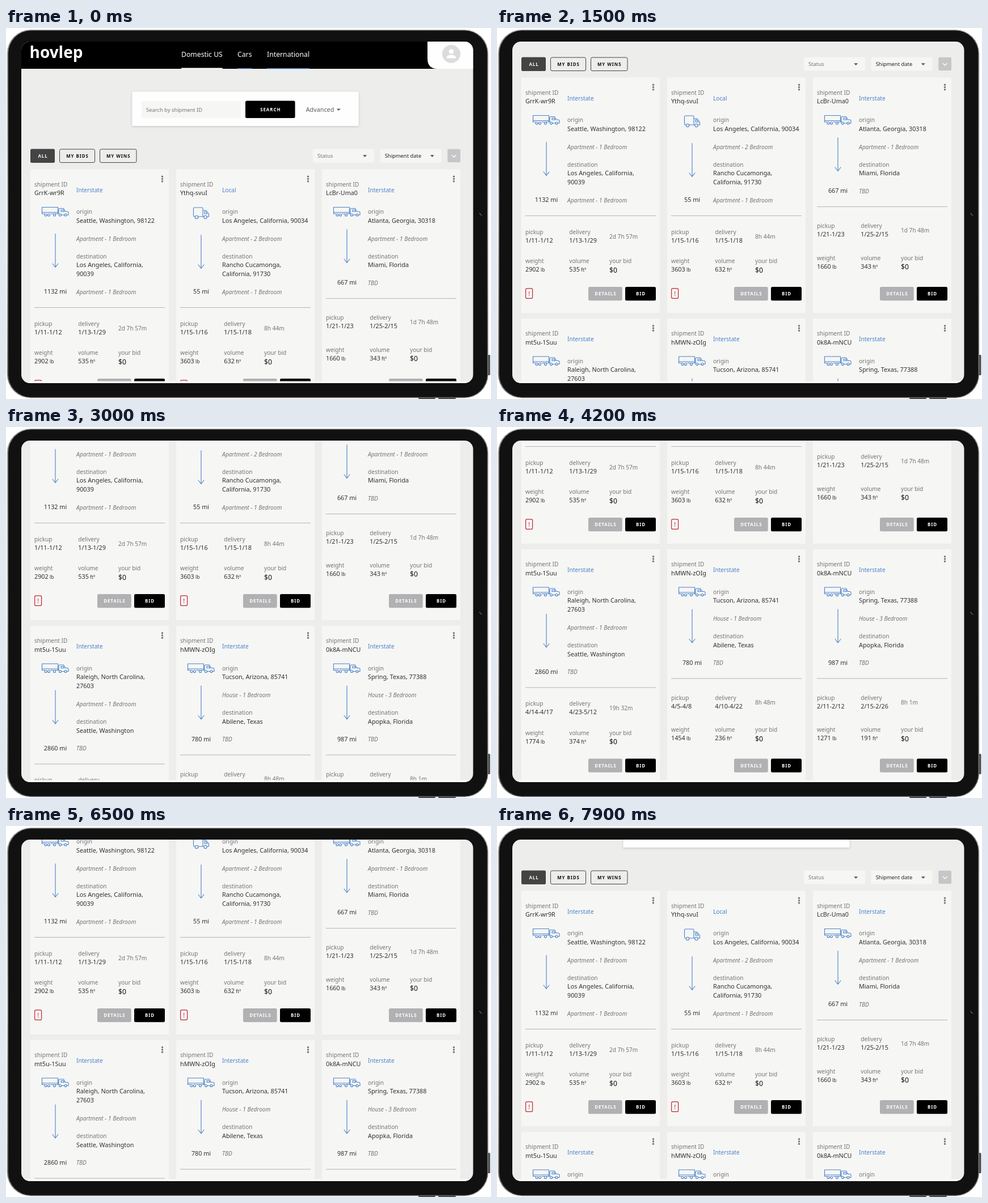
These frames come from a looping animation (855x655 px, 8 s). An HTML page:

```html
<!DOCTYPE html>
<html lang="en">
<head>
<meta charset="utf-8">
<title>Shipment board</title>
<style>
  html, body { margin: 0; width: 100%; height: 100%; overflow: hidden; background: #fff; }
  svg { display: block; width: 855px; height: 655px; }
  text { font-family: "Noto Sans", "Open Sans", sans-serif; white-space: pre; }
  .label { font-size: 10.1px; fill: #757575; }
  .value { font-size: 10.8px; font-weight: 500; fill: #303030; }
  .unit { font-size: 8.6px; font-weight: 400; }
  .kind { font-size: 10.1px; font-style: italic; fill: #757575; }
  .link { font-size: 10.1px; fill: #4a82c9; }
  .price { font-size: 12.24px; fill: #111; }
  .mid { text-anchor: middle; }
  .btn { font-size: 7.92px; font-weight: 700; letter-spacing: .95px; text-anchor: middle; }
  .tab { font-size: 12.24px; fill: #fff; }
  .field { font-size: 9.4px; fill: #757575; }
  .logo { font-size: 28px; font-weight: 700; fill: #fff; }
  .line { fill: none; stroke: #4a82c9; stroke-width: 1.1; stroke-linejoin: round; stroke-linecap: round; }
</style>
</head>
<body>
<svg viewBox="0 0 855 655" xmlns="http://www.w3.org/2000/svg">
  <defs>
    <clipPath id="screen"><rect x="27" y="24" width="796.5" height="603" rx="15"/></clipPath>
    <linearGradient id="metal" x1="0" y1="0" x2="0" y2="1">
      <stop offset="0" stop-color="#8d8e8f"/>
      <stop offset=".5" stop-color="#a9aaab"/>
      <stop offset="1" stop-color="#6c6d6e"/>
    </linearGradient>
    <filter id="soft" x="-5%" y="-20%" width="110%" height="140%">
      <feDropShadow dx="0" dy="1" stdDeviation="2" flood-color="#000" flood-opacity=".18"/>
    </filter>
  </defs>
  <g id="device"></g>
  <g clip-path="url(#screen)">
    <rect x="27" y="24" width="797" height="603" fill="#ededec"/>
    <g id="page"></g>
    <rect x="31" y="623.5" width="789" height="4" fill="#fafaf9"/>
  </g>
</svg>
<script>
const rect = (x, y, w, h, fill, r = 0, extra = '') =>
  `<rect x="${x}" y="${y}" width="${w}" height="${h}" rx="${r}" fill="${fill}" ${extra}/>`;
const text = (x, y, cls, str, fill) =>
  `<text x="${x}" y="${y}" class="${cls}"${fill ? ` style="fill:${fill}"` : ''}>${str}</text>`;
const circle = (x, y, r, fill) => `<circle cx="${x}" cy="${y}" r="${r}" fill="${fill}"/>`;
const line = d => `<path class="line" d="${d}"/>`;
const ring = (x, y, r) => `<circle class="line" cx="${x}" cy="${y}" r="${r}"/>`;
const caret = (x, y, fill) => `<path d="M${x - 3.5} ${y - 1.7}h7l-3.5 3.6z" fill="${fill}"/>`;

function button(x, y, w, h, label, fill, ink = '#fff', extra = '') {
  return rect(x, y, w, h, fill, 2.5, extra) + text(x + w / 2 + .5, y + h / 2 + 2.9, 'btn', label, ink);
}

// Icons are placed relative to the top left corner of a card.
const truck = line('M20.5 67h28v11.5h-5.5M40.5 78.5H36M24.5 78.5h-4V67M50 78.5V71q0-2 2-2h6.500l3 5.500h3.500q2 0 2 2v4h-3M60 80.500h-5M48.500 78.500h1.500M20.500 76h28M54 71.500h4l1.500 3h-5.500z')
  + ring(27, 80.5, 2) + ring(32.5, 80.5, 2) + ring(42.5, 80.5, 2) + ring(52.5, 80.5, 2) + ring(62, 80.5, 2);
const van = line('M33 83.5h-1q-1.500 0-1.500-1.500V69q0-1.500 1.500-1.500h13.500q1.500 0 1.500 1.500v14.500h-8M47 72.500h5.500l5 6v5h-3M48.500 83.500h-1.500M50 74.500h2l3 4h-5z')
  + ring(36, 84.5, 2.7) + ring(51.5, 84.5, 2.7);
const arrow = y => line(`M44 ${y}v59m-5-6.500l5 6.500l5-6.500`);

function card(c, i) {
  const lines = c.from.length + c.to.length;
  const short = lines < 3 ? 1 : 0;
  const shift = 16 * short;
  const isLocal = c.type === 'Local';
  const rows = (list, y) => list.map((s, n) => text(81, y + 16 * n, 'value', s)).join('');
  const second = 94 + 16 * (c.from.length - 1);
  const dest = second + 78.5;
  const dates = 276 - 10.5 * short;
  const load = 327.5 - 5.3 * short;
  const amount = (x, n, unit) => text(x, load + 15, 'value', `${n}<tspan class="unit"> ${unit}</tspan>`);
  const alert = rect(7.6, 372.3, 12, 17.6, 'none', 2.2, 'stroke="#c1272d" stroke-width="1.2"')
    + text(13.6, 385, 'value mid', '!', '#c1272d');
  return `<g transform="translate(${43 + 257 * (i % 3)} ${249.5 + 425.5 * Math.floor(i / 3)})">`
    + rect(0, 0, 244, 415.5, '#f6f6f5')
    + [12.7, 17, 21.3].map(y => circle(232.5, y, 1.7, '#777')).join('')
    + text(7, 30.3, 'label', 'shipment ID') + text(7, 45.6, 'value', c.id)
    + text(81, 40.3, 'link', c.type)
    + (isLocal ? van : truck) + arrow((isLocal ? 116 : 114) - 8 * short)
    + text(44, 219.5 - shift, 'value mid', c.miles + ' mi')
    + text(81, 78.7, 'label', 'origin') + rows(c.from, 94)
    + text(81, second + 32, 'kind', c.home)
    + text(81, second + 63, 'label', 'destination') + rows(c.to, dest)
    + text(81, 220.3 - shift, 'kind', c.end)
    + rect(7, 243.5 - shift, 230, 1, '#b4b4b4')
    + text(7, dates, 'label', 'pickup') + text(7, dates + 15.3, 'value', c.pickup)
    + text(84.3, dates, 'label', 'delivery') + text(84.3, dates + 15.3, 'value', c.delivery)
    + text(155, dates + 8.2, 'label', c.left)
    + text(7, load, 'label', 'weight') + amount(7, c.weight, 'lb')
    + text(84.3, load, 'label', 'volume') + amount(84.3, c.volume, 'ft³')
    + text(155, load, 'label', 'your bid') + text(155, load + 16.6, 'price', '$0')
    + (c.alert ? alert : '')
    + button(118, 369.5, 59.7, 24.3, 'DETAILS', '#b1b1b3')
    + button(183, 369.5, 54, 24.3, 'BID', '#000')
    + '</g>';
}

const ROOM = 'Apartment - 1 Bedroom';
const cards = [
  { id: 'GrrK-wr9R', type: 'Interstate', from: ['Seattle, Washington, 98122'], to: ['Los Angeles, California,', '90039'],
    home: ROOM, end: ROOM, miles: 1132, pickup: '1/11-1/12', delivery: '1/13-1/29', left: '2d 7h 57m', weight: 2902, volume: 535, alert: true },
  { id: 'Ythq-svuI', type: 'Local', from: ['Los Angeles, California, 90034'], to: ['Rancho Cucamonga,', 'California, 91730'],
    home: 'Apartment - 2 Bedroom', end: ROOM, miles: 55, pickup: '1/15-1/16', delivery: '1/15-1/18', left: '8h 44m', weight: 3603, volume: 632, alert: true },
  { id: 'LcBr-Uma0', type: 'Interstate', from: ['Atlanta, Georgia, 30318'], to: ['Miami, Florida'],
    home: ROOM, end: 'TBD', miles: 667, pickup: '1/21-1/23', delivery: '1/25-2/15', left: '1d 7h 48m', weight: 1660, volume: 343 },
  { id: 'mt5u-1Suu', type: 'Interstate', from: ['Raleigh, North Carolina,', '27603'], to: ['Seattle, Washington'],
    home: ROOM, end: 'TBD', miles: 2860, pickup: '4/14-4/17', delivery: '4/23-5/12', left: '19h 32m', weight: 1774, volume: 374 },
  { id: 'hMWN-zOIg', type: 'Interstate', from: ['Tucson, Arizona, 85741'], to: ['Abilene, Texas'],
    home: 'House - 1 Bedroom', end: 'TBD', miles: 780, pickup: '4/5-4/8', delivery: '4/10-4/22', left: '8h 48m', weight: 1454, volume: 236 },
  { id: '0k8A-mNCU', type: 'Interstate', from: ['Spring, Texas, 77388'], to: ['Apopka, Florida'],
    home: 'House - 3 Bedroom', end: 'TBD', miles: 987, pickup: '2/11-2/12', delivery: '2/15-2/26', left: '8h 1m', weight: 1271, volume: 191 }
];

const header = rect(27, 24, 797, 48, '#000')
  + text(41.5, 52.5, 'logo', 'hovlep')
  + text(309, 51, 'tab', 'Domestic US') + rect(309, 70.5, 72.7, 1.8, '#fff')
  + text(408, 51, 'tab', 'Cars') + rect(408, 71, 25.5, 1.2, '#4a82c9')
  + text(460, 51, 'tab', 'International') + rect(460, 71, 75, 1.2, '#4a82c9')
  + '<path d="M743 24h81v48h-63q-18 0-18-18z" fill="#fefefe"/>'
  + circle(785, 45.7, 16, '#dcdcdd') + circle(785, 41.5, 4.2, '#fff')
  + '<path d="M777 53.500v-1.500q0-4.500 8-4.500t8 4.500v1.500z" fill="#fff"/>';

const search = rect(222.5, 112.5, 399, 60.5, '#fefefe', 1.5, 'filter="url(#soft)"')
  + rect(239, 128.7, 175, 30.3, '#f6f6f5', 2)
  + text(247, 147.5, 'field', 'Search by shipment ID')
  + button(422, 128.5, 87.6, 30.5, 'SEARCH', '#000')
  + text(528.7, 148, 'value', 'Advanced', '#5c5c5c') + caret(586.3, 144.2, '#5c5c5c');

const outline = 'stroke="#444" stroke-width="1"';
const filters = button(43, 213.5, 43, 24.5, 'ALL', '#444')
  + button(94.5, 214, 62, 23.5, 'MY BIDS', 'none', '#111', outline)
  + button(165.5, 214, 64.5, 23.5, 'MY WINS', 'none', '#111', outline)
  + rect(541, 213.5, 108, 24, '#f6f6f5', 2) + text(549, 229.3, 'field', 'Status') + caret(632.7, 226, '#555')
  + rect(659.5, 213.5, 108, 24, '#f6f6f5', 2) + text(667.7, 229.3, 'field', 'Shipment date', '#222') + caret(751.3, 226, '#555')
  + rect(778.3, 213.7, 22.7, 23.3, '#c6c6c8', 2)
  + '<path d="M786 224.300l3.800 3.800l3.800-3.800" fill="none" stroke="#fff" stroke-width="1.400"/>';

const device = rect(849, 577, 4.5, 36, '#4a4b4c', 1.5)
  + rect(727, 650, 30, 4.7, '#222', 1.5) + rect(762, 650, 31, 4.7, '#222', 1.5)
  + rect(1.8, 3, 848.4, 650.3, 'url(#metal)', 42)
  + rect(4, 4.5, 844.5, 647.3, '#111', 40)
  + '<path d="M835 326.500q0.500 3.500 4 4.500" fill="none" stroke="#8a8a8a" stroke-width="1"/>';

const page = document.getElementById('page');
document.getElementById('device').innerHTML = device;
page.innerHTML = header + search + filters + cards.map(card).join('');

// Scroll path as [tick, notch]; the view only moves on the listed ticks.
const LOOP = 8000, TICK = 100, NOTCH = 13.5;
const path = [[0, 0], [15, 12], [30, 24], [42, 34], [52, 34], [59, 27], [65, 22], [79, 10]];
const moves = [0, 1, 2, 4, 5, 6, 7, 9, 11, 13, 15, 18, 20, 21, 23, 25, 27, 29, 30, 32, 34, 35, 37, 40, 42,
  53, 54, 56, 57, 59, 60, 62, 63, 64, 65, 66, 67, 69, 70, 72, 74, 75, 77, 78, 79];

function scrollAt(ms) {
  const tick = moves.filter(m => m * TICK <= ms).pop();
  const i = Math.max(1, path.findIndex(p => p[0] >= tick));
  const [a, from] = path[i - 1], [b, to] = path[i];
  return Math.floor(NOTCH * Math.round(from + (to - from) * (tick - a) / (b - a)));
}

const start = performance.now();
function draw() {
  const ms = (performance.now() - start) % LOOP;
  page.setAttribute('transform', `translate(0 ${-scrollAt(ms)})`);
  requestAnimationFrame(draw);
}
draw();
</script>
</body>
</html>
```
